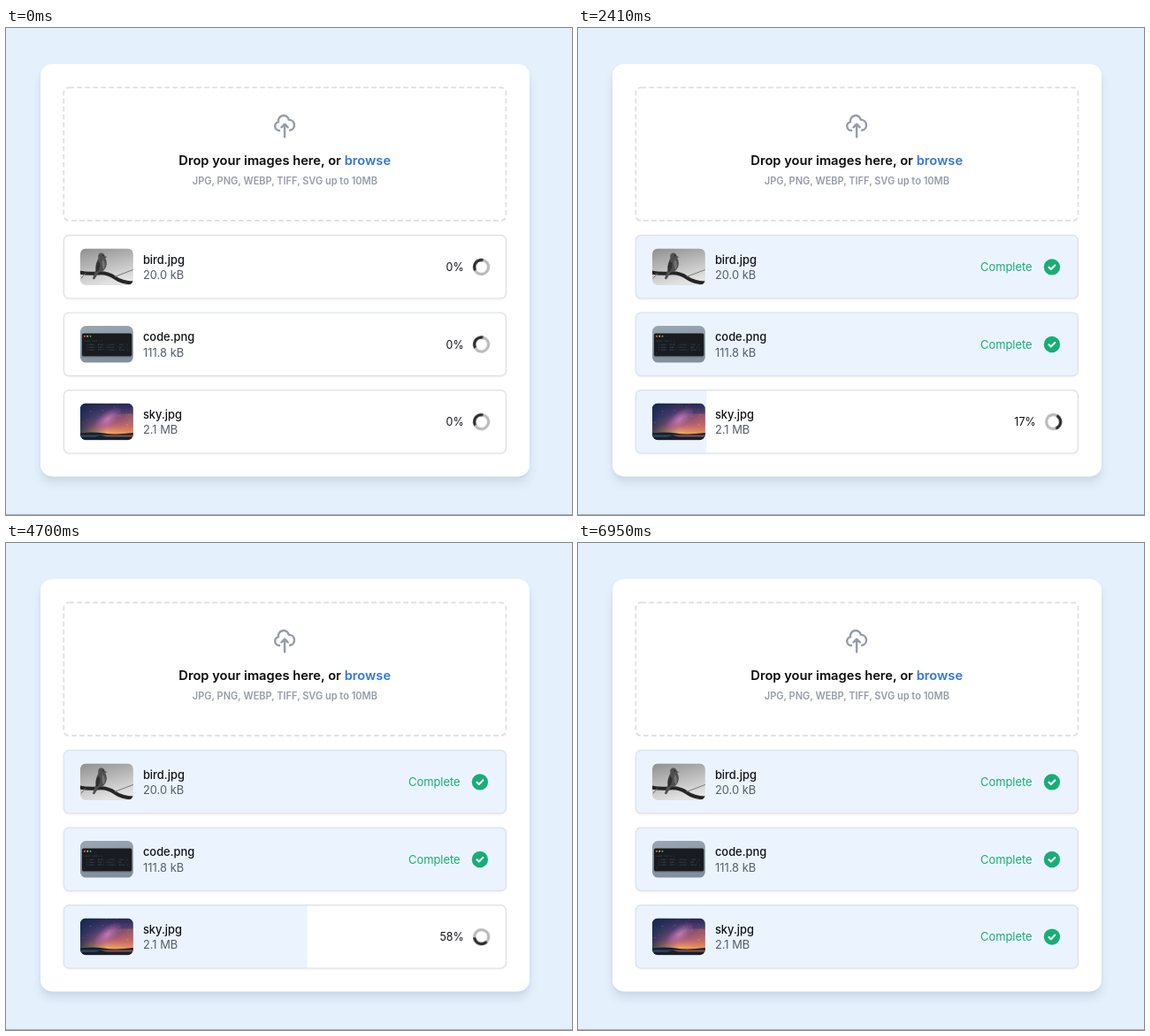
Animation, 640 px wide and 551 px high, one loop 7000 ms. Source, as an HTML page:

```html
<!DOCTYPE html>
<html lang="en">
<head>
<meta charset="utf-8">
<title>Image upload</title>
<style>
  html, body { margin: 0; width: 100%; height: 100%; overflow: hidden; background: #e4f0fc; }
  svg { display: block; }
  text { font-family: Inter, "Open Sans", sans-serif; font-size: 12.9px; fill: #111318; }
  .card { fill: #fff; filter: drop-shadow(0 8px 5px rgba(30, 50, 80, .09)) drop-shadow(0 2px 2px rgba(30, 50, 80, .05)); }
  .drop { fill: none; stroke: #dddee1; stroke-width: 1.7; stroke-dasharray: 5.6 3.4; }
  .cloud { fill: none; stroke: #959ca7; stroke-width: 2; stroke-linecap: round; stroke-linejoin: round; }
  .title { font-size: 14.7px; font-weight: 600; fill: #0b0b0d; }
  .link { fill: #3574e2; }
  .hint { font-size: 11.03px; font-weight: 600; fill: #969ca6; }
  .box { fill: #fff; filter: drop-shadow(0 1px 1px rgba(0, 0, 0, .06)); }
  .fill { fill: #ebf4fe; }
  .edge { fill: none; stroke: #dfe3e9; stroke-width: 1.4; }
  .name { font-weight: 500; }
  .size { fill: #555d69; }
  .right { text-anchor: end; }
  .percent { font-size: 12.4px; }
  .done { fill: #17ae75; }
  .tick { fill: none; stroke: #fff; stroke-width: 2.1; stroke-linecap: round; stroke-linejoin: round; }
  .spin { animation: spin 1s linear infinite; }
  .code { font: 2.5px "DejaVu Sans Mono", monospace; fill: #47617a; }
  @keyframes spin { from { transform: rotate(12deg); } to { transform: rotate(372deg); } }
</style>
</head>
<body>
<svg id="stage" width="640" height="551" viewBox="0 0 640 551">
  <defs>
    <clipPath id="rowClip"><rect width="501" height="72.4" rx="6.5"/></clipPath>
    <clipPath id="thumbClip"><rect width="60" height="41.6" rx="6.5"/></clipPath>
    <linearGradient id="fog" x2=".35" y2="1">
      <stop stop-color="#8f8f8f"/><stop offset=".45" stop-color="#b4b4b4"/><stop offset="1" stop-color="#e2e2e2"/>
    </linearGradient>
    <linearGradient id="slate" x2=".2" y2="1">
      <stop stop-color="#9aa6b2"/><stop offset="1" stop-color="#82909d"/>
    </linearGradient>
    <linearGradient id="dusk" x2="0" y2="1">
      <stop stop-color="#232850"/><stop offset=".35" stop-color="#61447c"/>
      <stop offset=".6" stop-color="#b0617b"/><stop offset=".8" stop-color="#f6a85c"/>
    </linearGradient>
    <linearGradient id="night">
      <stop stop-color="#10284c" stop-opacity=".8"/><stop offset=".5" stop-color="#10284c" stop-opacity="0"/>
    </linearGradient>
    <linearGradient id="warm">
      <stop offset=".45" stop-color="#d9704e" stop-opacity="0"/><stop offset="1" stop-color="#d9704e" stop-opacity=".5"/>
    </linearGradient>
    <radialGradient id="glow"><stop stop-color="#e58ac4" stop-opacity=".7"/><stop offset="1" stop-color="#c06cc0" stop-opacity="0"/></radialGradient>

    <g id="bird">
      <rect width="60" height="42" fill="url(#fog)"/>
      <path d="M-1 27Q9 29 20 28T39 33T61 39" fill="none" stroke="#252525" stroke-width="4"/>
      <path d="M39 32L60 24M6 28L1 34" stroke="#777" stroke-width="1"/>
      <path d="M20.5 11C19.5 6.5 22 4.6 24.7 5.2Q27.4 5.8 28 8.6L30.4 9.8L28.2 10.6C31.5 16 30 23 25 26L21 27L16 35L14 34.2L17.5 24C16.8 19 18.6 15 20.5 11Z" fill="#4f4f4f"/>
      <path d="M20 14Q16.5 21 18.5 27Q23 23 22.5 17Z" fill="#303030"/>
      <path d="M25.5 12Q30 18 26.5 24Q23.5 19 25.5 12Z" fill="#747474"/>
      <circle cx="25.8" cy="8.2" r=".7" fill="#161616"/>
    </g>
    <g id="code">
      <rect width="60" height="42" fill="url(#slate)"/>
      <rect x="2" y="9.4" width="56.4" height="26" rx="1.6" fill="#4b5663" opacity=".5"/>
      <rect x="2" y="8.4" width="56.4" height="25.8" rx="1.6" fill="#191b1f"/>
      <circle cx="5" cy="11.7" r="1" fill="#f0655a"/>
      <circle cx="8.3" cy="11.7" r="1" fill="#eab540"/>
      <circle cx="11.6" cy="11.7" r="1" fill="#45b854"/>
      <text class="code" x="4" y="18.4">const list = [</text>
      <text class="code" x="6.5" y="22">{ name: 'Wren', colour: 'red' },</text>
      <text class="code" x="6.5" y="25.2">{ name: 'Oak', colour: 'tan' },</text>
      <text class="code" x="6.5" y="28.4">{ name: 'Rill', colour: 'blue' },</text>
      <text class="code" x="4" y="31.6">]</text>
    </g>
    <g id="sky">
      <rect width="60" height="42" fill="url(#dusk)"/>
      <rect width="60" height="36" fill="url(#night)"/>
      <rect y="12" width="60" height="24" fill="url(#warm)"/>
      <ellipse cx="31" cy="18" rx="20" ry="9" transform="rotate(-38 31 18)" fill="url(#glow)"/>
      <g id="stars" fill="#fff"></g>
      <path d="M0 34Q14 32 27 34T60 33.5V42H0Z" fill="#17202f"/>
      <path d="M22 36H60V38H30Z" fill="#a8685a" opacity=".75"/>
      <path d="M0 36H24L17 38.2H0Z" fill="#315371" opacity=".8"/>
    </g>

    <g id="ring">
      <circle cx="12" cy="12" r="10" fill="none" stroke="#000" stroke-opacity=".27" stroke-width="4"/>
      <path d="M4 12a8 8 0 018-8V0C5.373 0 0 5.373 0 12h4zm2 5.291A7.962 7.962 0 014 12H0c0 3.042 1.135 5.824 3 7.938l3-2.647z" opacity=".78"/>
    </g>
  </defs>

  <rect width="640" height="551" fill="#e4f0fc"/>
  <rect y="550" width="640" height="1" fill="#a9b2bb"/>
  <rect class="card" x="39" y="40.8" width="553" height="466.6" rx="13"/>
  <rect class="drop" x="65.3" y="67.3" width="500.2" height="150.6" rx="6"/>
  <path class="cloud" transform="translate(300.6 96.6) scale(1.208)"
    d="M7 16a4 4 0 01-.88-7.903A5 5 0 1115.9 6L16 6a5 5 0 011 9.9M15 13l-3-3m0 0l-3 3m3-3v12"/>
  <text class="title" x="315.2" y="155" text-anchor="middle">Drop your images here, or <tspan class="link">browse</tspan></text>
  <text class="hint" x="315.4" y="177.3" text-anchor="middle">JPG, PNG, WEBP, TIFF, SVG up to 10MB</text>
  <g id="rows"></g>
</svg>

<script>
  const LOOP = 7000;
  const LAG = 150;      // the bar follows behind the number
  const WIDTH = 501;

  // points: [ms, percent]; done: when the row turns to "Complete"
  const files = [
    { name: 'bird.jpg', size: '20.0 kB', art: 'bird', done: 1250, points: [[760, 0], [900, 100]] },
    { name: 'code.png', size: '111.8 kB', art: 'code', done: 1800, points: [[760, 0], [1150, 100]] },
    { name: 'sky.jpg', size: '2.1 MB', art: 'sky', done: 6400,
      points: [[780, 0], [1200, 8.7], [1510, 10.2], [2410, 17.2], [3550, 32.6], [3700, 37],
        [4700, 58.2], [5600, 85.2], [5750, 88], [6170, 100]] }
  ];

  const rowMarkup = (file, i) => `
    <g transform="translate(64.9 ${234 + i * 87.6})">
      <rect class="box" width="${WIDTH}" height="72.4" rx="6.5"/>
      <g clip-path="url(#rowClip)"><rect class="fill" width="0" height="72.4"/></g>
      <rect class="edge" x=".5" y=".5" width="${WIDTH - 1}" height="71.4" rx="6"/>
      <g transform="translate(19 15.4)" clip-path="url(#thumbClip)"><use href="#${file.art}"/></g>
      <text class="name" x="90" y="32.8">${file.name}</text>
      <text class="size" x="90" y="50.3">${file.size}</text>
      <g class="busy">
        <text class="percent right" x="452.7" y="41"></text>
        <g transform="translate(472.7 36.4)"><g class="spin">
          <use href="#ring" transform="scale(.8) translate(-12 -12)"/>
        </g></g>
      </g>
      <g class="ready">
        <text class="done right" x="448.7" y="41">Complete</text>
        <circle class="done" cx="471" cy="36.4" r="9.2"/>
        <path class="tick" d="M467.6 36.7l2.3 2.3 4.5-4.6"/>
      </g>
    </g>`;

  const rowsBox = document.getElementById('rows');
  rowsBox.innerHTML = files.map(rowMarkup).join('');
  const rows = [...rowsBox.children].map(el => ({
    fill: el.querySelector('.fill'),
    percent: el.querySelector('.percent'),
    busy: el.querySelector('.busy'),
    ready: el.querySelector('.ready')
  }));

  let seed = 7;
  const random = () => (seed = seed * 16807 % 2147483647) / 2147483647;
  document.getElementById('stars').innerHTML = Array.from({ length: 45 }, () =>
    `<circle cx="${random() * 60}" cy="${random() * 28}" r="${.15 + random() * .25}" opacity="${.3 + random() * .5}"/>`
  ).join('');

  function progress(points, t) {
    if (t <= points[0][0]) return 0;
    const k = points.findIndex(p => p[0] > t);
    if (k < 0) return 100;
    const [t0, a] = points[k - 1], [t1, b] = points[k];
    return a + (b - a) * (t - t0) / (t1 - t0);
  }

  function draw(t) {
    files.forEach((file, i) => {
      const row = rows[i], done = t >= file.done;
      row.percent.textContent = Math.round(progress(file.points, t)) + '%';
      row.fill.setAttribute('width', WIDTH * progress(file.points, t - LAG) / 100);
      row.busy.style.display = done ? 'none' : '';
      row.ready.style.display = done ? '' : 'none';
    });
  }

  const start = performance.now();
  function tick() {
    draw((performance.now() - start) % LOOP);
    requestAnimationFrame(tick);
  }
  draw(0);
  requestAnimationFrame(tick);
</script>
</body>
</html>
```
